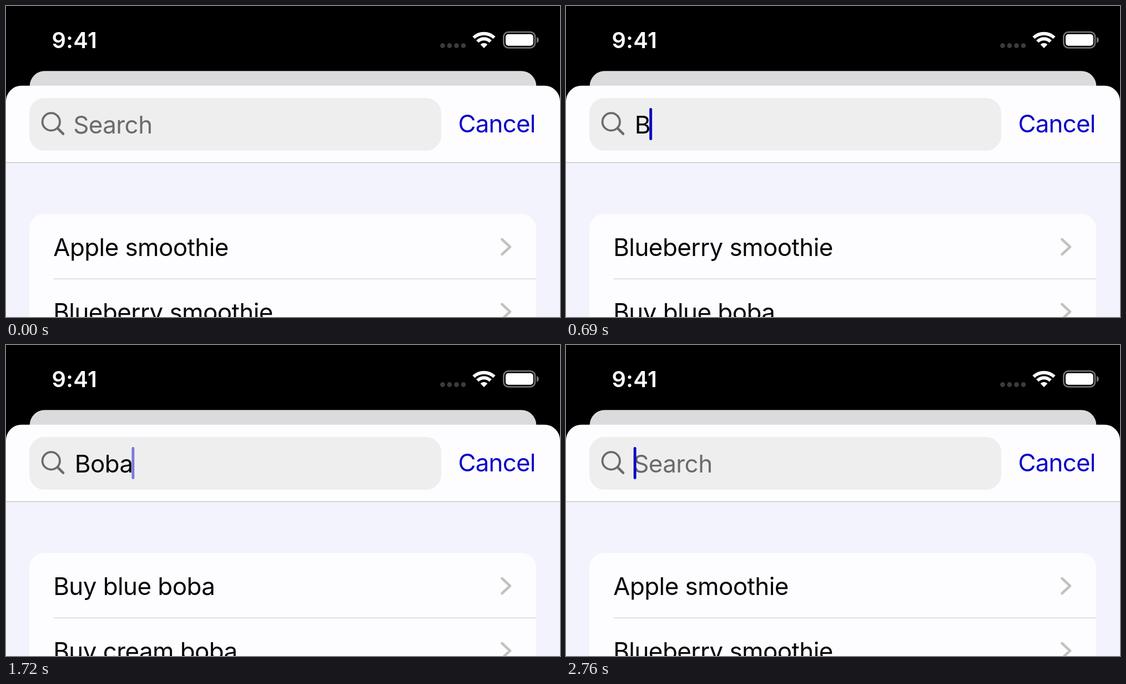
Animation, 998 px wide and 561 px high, one loop 3190 ms. Source, as an HTML page:

```html
<!DOCTYPE html>
<html lang="en">
<head>
<meta charset="utf-8">
<title>Search list</title>
<style>
  html, body { margin: 0; width: 100%; height: 100%; overflow: hidden; background: #000; }
  svg { display: block; width: 100%; height: 100%; }
  text {
    font: 400 43.9px Inter, Roboto, sans-serif;
    font-optical-sizing: none;
    letter-spacing: -0.0125em;
    white-space: pre;
    fill: #060606;
  }
  .clock { font-size: 39.8px; font-weight: 600; letter-spacing: 0.01em; fill: #fff; }
  .hint { fill: #6b6b6b; }
  .link { fill: #0d06c6; letter-spacing: -0.019em; }
  .paper { fill: #fdfcff; }
  .line { fill: none; stroke-linecap: round; stroke-linejoin: round; }
</style>
</head>
<body>
<svg viewBox="0 0 998 561" preserveAspectRatio="none">
  <defs>
    <path id="chevron" class="line" d="M893.5 421 L908 434.5 L893.5 448" stroke="#c3c2be" stroke-width="4.6"/>
  </defs>
  <rect width="998" height="561"/>

  <!-- status bar -->
  <text class="clock" x="82.4" y="75.7">9:41</text>
  <g fill="#3b3b40">
    <circle cx="786.5" cy="71.5" r="4.4"/>
    <circle cx="799" cy="71.5" r="4.4"/>
    <circle cx="811.5" cy="71.5" r="4.4"/>
    <circle cx="824" cy="71.5" r="4.4"/>
  </g>
  <g fill="none" stroke="#fff" stroke-width="6">
    <path d="M842.4 57.2 A26.8 26.8 0 0 1 879.6 57.2"/>
    <path d="M849.2 64.2 A16.8 16.8 0 0 1 872.8 64.2"/>
  </g>
  <path d="M861 76 L854.6 69.4 A9.2 9.2 0 0 1 867.4 69.4 Z" fill="#fff"/>
  <rect x="896.5" y="47" width="56.5" height="28.5" rx="8.5" fill="none" stroke="#77777a" stroke-width="2.6"/>
  <rect x="900" y="50.8" width="49.8" height="21" rx="5" fill="#fff"/>
  <path d="M956 56 Q959.8 57.5 959.8 61.3 Q959.8 65.2 956 66.7 Z" fill="#77777a"/>

  <!-- sheets -->
  <rect x="42.7" y="117.3" width="912.6" height="80" rx="27" fill="#dbdbdd"/>
  <rect class="paper" y="143.7" width="998" height="460" rx="28"/>
  <rect y="282" width="998" height="279" fill="#f2f3fc"/>
  <rect y="281.8" width="998" height="1.3" fill="#c5c3bf"/>

  <!-- search bar -->
  <rect x="42" y="166" width="742" height="95" rx="27" fill="#eeeeef"/>
  <g class="line" stroke="#6b6b6b">
    <circle cx="81.3" cy="208.9" r="15.7" stroke-width="3.8"/>
    <path d="M93 220.7 L103 230.7" stroke-width="4.6"/>
  </g>
  <text class="hint" id="hint" x="121.2" y="230">Search</text>
  <text id="query" x="123.8" y="230"></text>
  <rect id="caret" y="184" width="4.9" height="58" rx="2.2" fill="#0b06c6"/>
  <text class="link" x="814.5" y="227.5">Cancel</text>

  <!-- results -->
  <rect class="paper" x="42" y="375" width="913" height="260" rx="27"/>
  <rect x="86" y="491.6" width="869" height="1.2" fill="#cfccd6"/>
  <text class="row" x="85.2" y="451.3"></text>
  <text class="row" x="85.2" y="568.3"></text>
  <use href="#chevron"/>
  <use href="#chevron" y="117"/>
</svg>

<script>
const LOOP = 3190;
const ITEMS = ['Apple smoothie', 'Blueberry smoothie', 'Buy blue boba', 'Buy cream boba'];
const CARET_X = [121.7, 150.2, 176.5, 202.3, 226.4]; // by number of typed letters

// [start ms, typed text, applied filter, caret opacity]
const STEPS = [
  [0, '', '', 0],
  [90, '', '', 0.1],
  [170, '', '', 0.3],
  [260, '', '', 0.55],
  [340, '', '', 1],
  [600, 'B', '', 1],
  [690, 'B', 'B', 1],
  [860, 'Bo', 'B', 1],
  [950, 'Bo', 'Bo', 1],
  [1030, 'Bob', 'Bo', 1],
  [1120, 'Bob', 'Bob', 1],
  [1200, 'Boba', 'Bob', 1],
  [1290, 'Boba', 'Boba', 1],
  [1640, 'Boba', 'Boba', 0.8],
  [1720, 'Boba', 'Boba', 0.5],
  [1810, 'Boba', 'Boba', 0.2],
  [1900, 'Bob', 'Boba', 1],
  [1980, 'Bob', 'Bob', 1],
  [2070, 'Bo', 'Bob', 1],
  [2150, 'Bo', 'Bo', 1],
  [2240, 'B', 'Bo', 1],
  [2330, 'B', 'B', 1],
  [2760, '', '', 1]
];

const byId = id => document.getElementById(id);
const hint = byId('hint'), query = byId('query'), caret = byId('caret');
const rows = document.querySelectorAll('.row');
let shown;

function show([, typed, filter, opacity]) {
  hint.style.display = typed ? 'none' : '';
  query.textContent = typed;
  caret.setAttribute('x', CARET_X[typed.length]);
  caret.setAttribute('opacity', opacity);
  const found = ITEMS.filter(s => s.toLowerCase().includes(filter.toLowerCase()));
  rows.forEach((row, i) => { row.textContent = found[i]; });
}

const start = performance.now();

function tick() {
  const t = (performance.now() - start) % LOOP;
  const step = STEPS.findLast(s => s[0] <= t);
  if (step !== shown) show(shown = step);
  requestAnimationFrame(tick);
}
tick();
</script>
</body>
</html>
```
